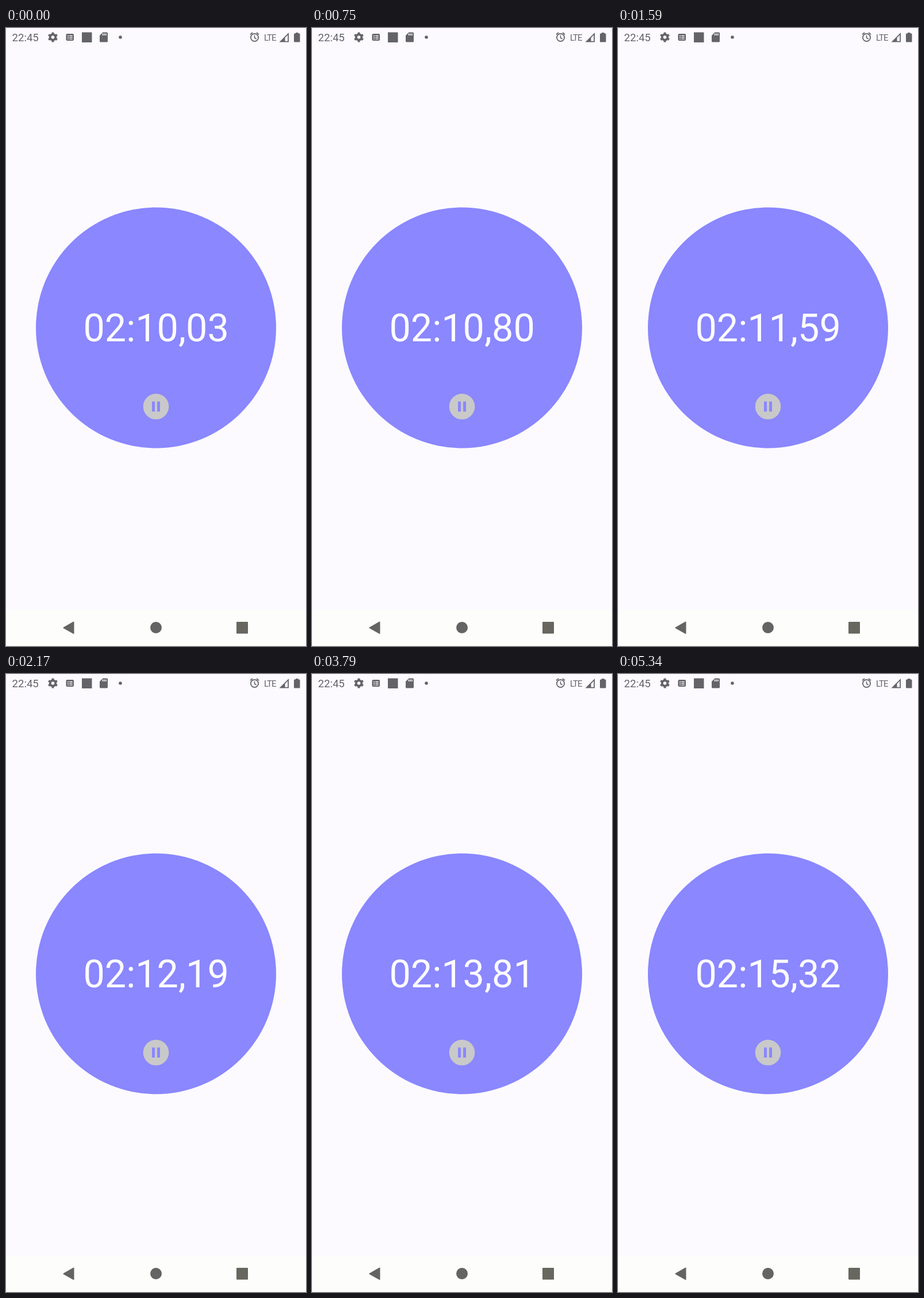
These frames come from a looping animation (522 by 1073 pixels, 5390 ms). An HTML page:

```html
<!DOCTYPE html>
<html lang="en">
<head>
<meta charset="utf-8">
<title>Stopwatch</title>
<style>
  html, body { margin: 0; width: 100%; height: 100%; overflow: hidden; background: #fcfaff; }
  svg { display: block; width: 522px; height: 1073px; font-family: Roboto, sans-serif; }
  .line { fill: none; stroke: #646468; }
  .gap { fill: none; stroke: #fcfaff; }
</style>
</head>
<body>
<svg viewBox="0 0 522 1073">
  <rect y="1010" width="522" height="63" fill="#fdfdfb"/>

  <!-- status bar -->
  <g fill="#646468">
    <text x="10.5" y="23" font-size="18.6">22:45</text>
    <g class="line">
      <circle cx="81.5" cy="16" r="4.8" stroke-width="4"/>
      <circle cx="81.5" cy="16" r="7.2" stroke-width="2.8" pathLength="12" stroke-dasharray="1 1" stroke-dashoffset="-.5"/>
    </g>
    <rect x="104.5" y="10" width="13.5" height="12" rx="2"/>
    <path class="gap" stroke-width="1.3" d="M107 13.5h2m1.3 0h5.4M107 16.3h2m1.3 0h5.4M107 19.1h2m1.3 0h5.4"/>
    <rect x="132" y="7.5" width="17.5" height="17.5"/>
    <path d="M168.500 7.500H175.500Q177 7.500 177 9V23Q177 24.500 175.500 24.500H164.500Q163 24.500 163 23V13Z"/>
    <path class="gap" stroke-width="1.5" d="M168.500 9.500v3.500m2.700-3.500v3.500m2.700-3.500v3.500"/>
    <circle cx="199" cy="16" r="2.8"/>
    <g class="line" stroke-width="1.8">
      <circle cx="432.500" cy="16.500" r="6.600"/>
      <path stroke-width="1.500" d="M432.500 12.500v4.500l3.200 2"/>
      <path d="M425 11.300l4-3.400M440 11.300l-4-3.400"/>
    </g>
    <text x="449" y="21.700" font-size="15" letter-spacing="-1">LTE</text>
    <path d="M475.500 24.500L492 8V24.500Z"/>
    <path fill="#fcfaff" d="M485.500 17L490.200 12.300V22.700H485.500Z"/>
    <path d="M504 8h4.500v1.500h2q1 0 1 1v13q0 1-1 1h-8.500q-1 0-1-1v-13q0-1 1-1h2z"/>
  </g>

  <!-- dial -->
  <circle cx="261" cy="520.5" r="209" fill="#8a87ff"/>
  <text id="time" x="134.400" y="544" font-size="66.5" fill="#fdfcff">02:10,03</text>
  <circle cx="261" cy="657.3" r="22.300" fill="#c9c9c9"/>
  <path fill="#8a87ff" d="M254 648.500h5v17.500h-5zM263 648.500h5v17.500h-5z"/>

  <!-- navigation bar -->
  <g fill="#646464" stroke="#646464" stroke-width="2" stroke-linejoin="round">
    <path d="M100.500 1041.300L117.500 1031.500V1051Z"/>
    <circle cx="261" cy="1041" r="9"/>
    <rect x="402" y="1032" width="18" height="18.500" fill="#67675f" stroke="#67675f"/>
  </g>
</svg>
<script>
  const LOOP = 5390, LAST_TICK = 128;
  const label = document.getElementById("time");
  // [tick, hundredths past 02:10]; a tick is 1/24 s
  const marks = [[0, 3], [18, 80], [38, 159], [66, 279], [91, 381], [112, 470], [128, 532]];
  const tickStart = i => Math.floor(i * 25 / 6 + 0.7) * 10;
  const pad = n => String(n).padStart(2, "0");

  function tickAt(ms) {
    let i = Math.min(LAST_TICK, Math.ceil(ms * 0.024) + 1);
    while (i > 0 && tickStart(i) > ms) i--;
    return i;
  }

  function elapsed(tick) {
    const k = Math.max(1, marks.findIndex(m => m[0] >= tick));
    const [t0, v0] = marks[k - 1], [t1, v1] = marks[k];
    return Math.round(v0 + (v1 - v0) * (tick - t0) / (t1 - t0));
  }

  function draw(now) {
    const n = elapsed(tickAt(now % LOOP));
    label.textContent = `02:${pad(10 + Math.floor(n / 100))},${pad(n % 100)}`;
  }

  const start = performance.now();
  function loop() {
    draw(performance.now() - start);
    requestAnimationFrame(loop);
  }
  loop();
</script>
</body>
</html>
```
